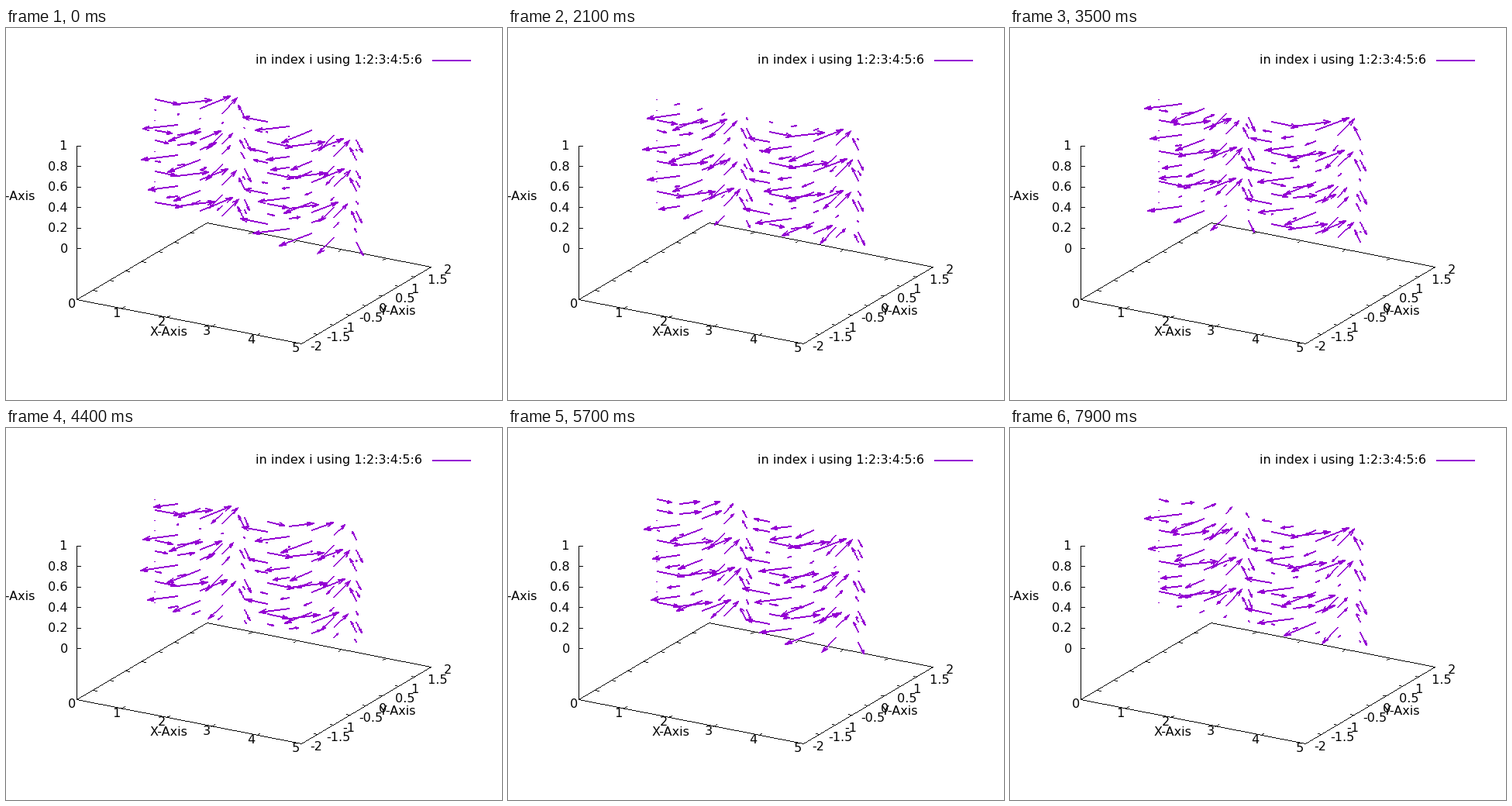
Animation, 640 px wide and 480 px high, one loop 8 s. Source, as a matplotlib script:

```python
import numpy as np
import matplotlib.pyplot as plt
from matplotlib.animation import FuncAnimation

W, H, DPI = 640, 480, 100
FRAMES, INTERVAL = 80, 100
PX = 72 / DPI
BLACK, PURPLE = (0, 0, 0), (148, 0, 211)

# Screen vectors of one unit along each axis
EX = np.array([57.83, 11.44])
EY = np.array([41.9, -24.77])
EZ = np.array([0, -132.2])
CORNER = np.array([91.4, 350.2])         # x = 0, y = -2 on the base plane
ORIGIN = CORNER + 2.4 * EY + 0.5 * EZ    # first vector: y = 0.4, z = 0

plt.rcParams["font.family"] = "DejaVu Sans"
fig = plt.figure(figsize=(W / DPI, H / DPI), dpi=DPI, facecolor="white")
ax = fig.add_axes([0, 0, 1, 1])
ax.axis("off")
backdrop = np.full((H, W, 3), 255, np.uint8)


def line(img, a, b, color=BLACK, width=1):
    """Draw a hard-edged line, thickened across its minor axis."""
    x0, y0, x1, y1 = (int(round(v)) for v in (*a, *b))
    dx, dy = abs(x1 - x0), abs(y1 - y0)
    n = max(dx, dy)
    t = np.arange(n + 1) / max(n, 1)
    xs = np.rint(x0 + (x1 - x0) * t).astype(int)
    ys = np.rint(y0 + (y1 - y0) * t).astype(int)
    for k in range(width):
        if dx > dy:
            img[ys - k, xs] = color
        else:
            img[ys, xs - k] = color


def label(x, y, text, ha="center"):
    ax.text(x, y, text, ha=ha, va="baseline", fontsize=16 * PX, color="black")


def tick(p, direction, size=4.5):
    line(backdrop, p, p + direction / np.hypot(*direction) * size)


def draw_axes():
    right, back = CORNER + 5 * EX, CORNER + 4 * EY
    far = right + 4 * EY
    for a, b in ((CORNER, right), (right, far), (far, back), (back, CORNER)):
        line(backdrop, a, b)
    for i in range(6):
        p = CORNER + i * EX
        if 0 < i < 5:
            tick(p, EY)
            tick(p + 4 * EY, -EY)
        label(82.6 + 57.9 * i, 361.3 + 11.44 * i, f"{i: g}")
    for i in range(9):
        p = CORNER + i / 2 * EY
        if 0 < i < 8:
            tick(p, EX)
            tick(p + 5 * EX, -EX)
        label(392.4 + 20.95 * i, 416.3 - 12.39 * i, f"{i / 2 - 2: g}", "left")
    zero = CORNER + 0.5 * EZ
    line(backdrop, CORNER, zero + EZ)
    for i in range(6):
        p = zero + i / 5 * EZ
        tick(p, np.array([1, 0]))
        label(79.8, p[1] + 5.4, f"{i / 5: g}", "right")
    label(210, 397.3, "X-Axis")
    label(505, 370.3, "Y-Axis")
    label(38, 222.3, "Z-Axis", "right")
    label(537.5, 46.3, "in index i using 1:2:3:4:5:6", "right")
    line(backdrop, (550, 42), (599, 42), PURPLE, 2)


draw_axes()
screen = ax.imshow(backdrop, extent=(0, W, H, 0), aspect="auto",
                   interpolation="nearest")
ax.set_xlim(0, W)
ax.set_ylim(H, 0)

col, row = (g.ravel() for g in np.meshgrid(np.arange(10), np.arange(11)))
base = ORIGIN + np.outer(col / 2, EX) + np.outer(1 - row / 10, EZ)
angle = 2 * np.pi * col / 10
vec = np.outer(0.6 * np.cos(angle), EX) + np.outer(0.8 * np.sin(angle), EY)


def arrow(img, a, v):
    tip = a + v
    line(img, a, tip, PURPLE, 2)
    size = np.hypot(*v)
    if size == 0:
        return
    u = v / size
    side = np.array([-u[1], u[0]]) * np.sin(np.pi / 12)
    barb = u * np.cos(np.pi / 12)
    head = np.clip(0.3 * size, 1.5, 9)
    for s in (side, -side):
        line(img, tip, tip - head * (barb + s), PURPLE, 2)


def update(n):
    s = np.cos(1.932 * row + 0.1 * n - 0.4)
    # Vectors leaving the x range shrink to a dot
    s[(col == 0) & (s < 0)] = 0
    img = backdrop.copy()
    for a, v in zip(base, vec * s[:, None]):
        arrow(img, a, v)
    screen.set_data(img)
    return (screen,)


anim = FuncAnimation(fig, update, frames=FRAMES, interval=INTERVAL,
                     init_func=lambda: update(0), repeat=True, repeat_delay=0,
                     blit=False)
plt.show()
```
